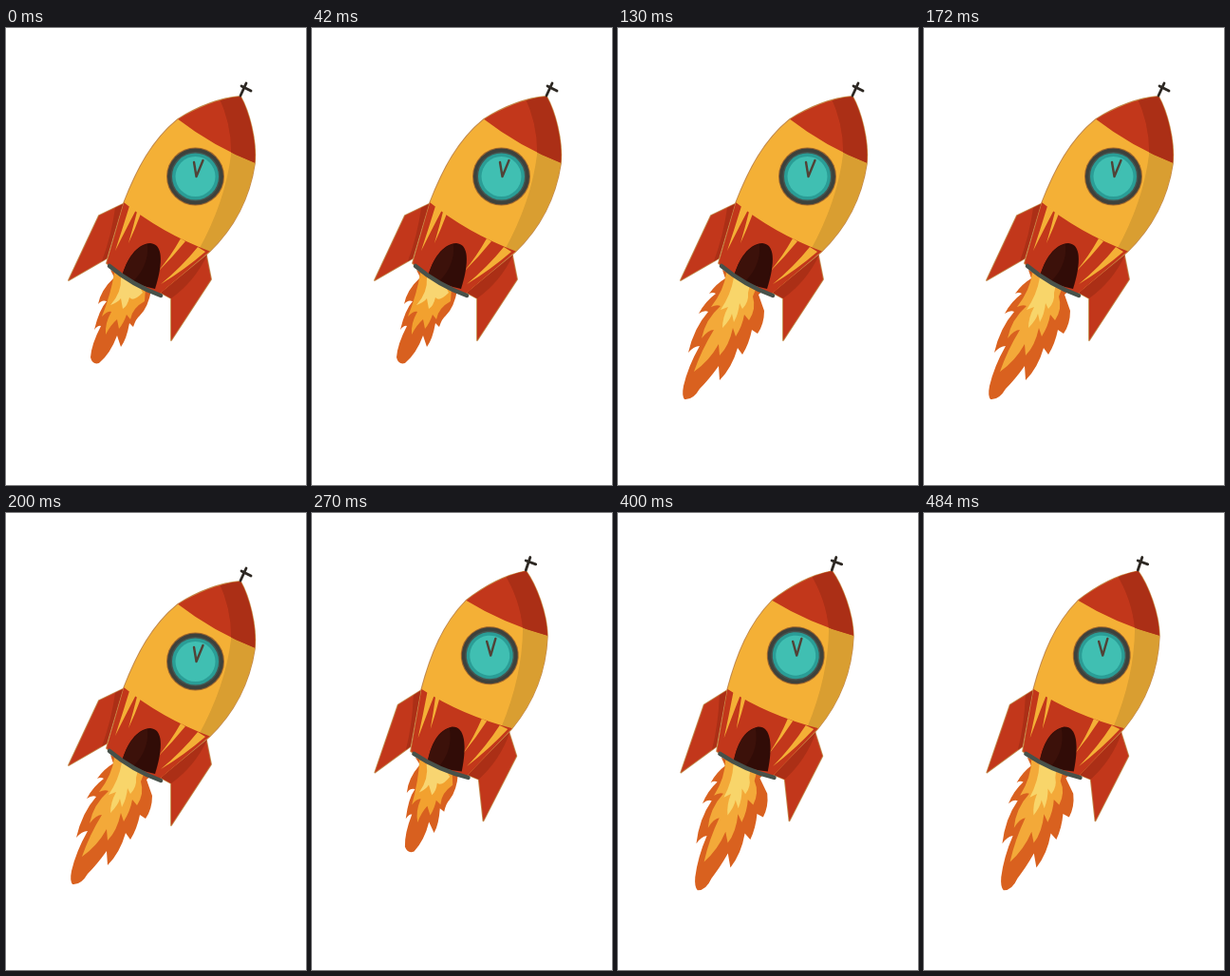
An HTML page with a canvas for the animation above (540 ms loop, 316 by 480 pixels).

```html
<!DOCTYPE html>
<html lang="en">
<head>
<meta charset="utf-8">
<title>Rocket</title>
<style>
html, body { margin: 0; width: 100%; height: 100%; overflow: hidden; background: #fff; }
canvas { display: block; width: 316px; height: 480px; }
</style>
</head>
<body>
<canvas id="stage"></canvas>
<script>
const W = 316, H = 480, LOOP = 540;
const PIVOT = [135, 266], TILT = -6.2 * Math.PI / 180;
const canvas = document.getElementById('stage');
const ctx = canvas.getContext('2d');
const dpr = window.devicePixelRatio || 1;
canvas.width = W * dpr;
canvas.height = H * dpr;

const RED = '#c2371b', DARK_RED = '#ab2f16', YELLOW = '#f4b036', DARK_YELLOW = '#d99e31';
const EDGE = '#c28a4c', METAL = '#47514a';

const hull = new Path2D('M247 72 C224 74 200 84 181 96 C154 118 138 148 124 184 L106 247 Q131 268 162 279 L214 235 C243 207 257 175 262 142 C264 118 256 88 247 72 Z');
const nose = new Path2D('M170 60 L180 95 Q219 125 263 142 L280 130 L260 60 Z');
const skirt = new Path2D('M118 180 L124 183 Q163 215 216 235 L214 290 H95 Z');
const shade = new Path2D('M223 70 Q239 101 237 133 Q231 182 203 233 L225 245 L275 150 L255 68 Z');
const shadeNose = new Path2D('M223 70 Q238 101 237 133 L263 145 L275 130 L250 65 Z');
const finLeft = new Path2D('M66 265 L98 197 L123 185 L106 242 Z');
const finLeftShade = new Path2D('M115 189 L123 185 L106 242 L101 245 Q111 218 115 189 Z');
const finRight = new Path2D('M174 328 L216 264 L211 239 L163 278 L174 284 Z');
const finRightShade = new Path2D('M212 238 L163 278 L174 284 Q199 266 212 238 Z');
const stripes = new Path2D('M130 187 L137 191 Q127 210 115 234 Q123 210 130 187 Z M138 193 L142 195 Q136 211 129 226 Q134 209 138 193 Z M184 221 L189 224 Q176 240 160 256 Q174 239 184 221 Z M202 230 L210 235 Q188 254 163 269 Q185 251 202 230 Z');
const door = new Path2D('M122 261 C127 243 137 227 152 226 C165 227 166 245 157 274 Q138 270 122 261 Z');
const doorLight = new Path2D('M122 261 C127 243 137 230 149 227 Q151 249 134 266 Z');
const rim = new Path2D('M109 250 Q133 270 163 281');
const antenna = new Path2D('M247 71 L253 58 M248 61 L258 66');
const hands = new Path2D('M198 141 L200.5 156 L207.5 139');

const flames = {
  small: [
    ['#d8601f', 'M110 254 L114 262 Q100 275 97 290 Q101 285 106 287 Q98 296 93 317 Q97 312 100 313 Q90 332 89 346 Q91 354 98 352 Q110 342 117 323 L121 335 Q127 327 130 310 L134 314 Q137 305 141 302 Q150 293 153 275 Z'],
    ['#f2a12f', 'M114 257 Q111 278 101 303 Q107 297 111 298 Q104 310 105 322 Q110 312 117 306 L119 316 Q124 310 127 301 L131 306 Q133 294 146 287 L147 273 Z'],
    ['#f8d571', 'M121 262 Q122 278 110 291 Q118 288 121 284 L123 295 Q128 292 130 283 Q134 288 144 278 L140 270 Z']
  ],
  big: [
    ['#d9611f', 'M110 254 L113 263 Q103 269 96 279 Q100 277 103 279 Q92 287 85 300 Q91 296 95 298 Q80 315 74 341 Q80 334 86 334 Q74 355 69 376 Q67 386 70 390 Q79 391 86 379 Q96 369 106 355 L107 370 Q120 357 126 336 L131 343 Q138 332 141 317 L147 321 Q154 311 154 297 L148 280 L154 275 Z'],
    ['#f3a939', 'M114 257 Q112 275 98 293 Q104 290 108 292 Q92 306 88 326 Q95 317 101 317 Q88 338 80 361 Q96 350 106 332 L107 344 Q117 334 121 315 L124 324 Q131 313 133 301 L138 307 Q146 295 142 282 L146 272 Z'],
    ['#f8d56a', 'M122 262 Q119 280 108 296 L116 293 Q110 304 110 315 Q118 307 120 300 L122 309 Q127 300 128 289 L131 295 Q138 288 137 278 L139 270 Z']
  ]
};
for (const set of Object.values(flames))
  for (const layer of set) layer[1] = new Path2D(layer[1]);

function fill(path, color) {
  ctx.fillStyle = color;
  ctx.fill(path);
}

function line(path, color, width) {
  ctx.strokeStyle = color;
  ctx.lineWidth = width;
  ctx.stroke(path);
}

function disc(r, color) {
  ctx.fillStyle = color;
  ctx.beginPath();
  ctx.arc(199.5, 156, r, 0, 2 * Math.PI);
  ctx.fill();
}

function drawBody() {
  ctx.save();
  ctx.clip(hull);
  fill(hull, YELLOW);
  fill(shade, DARK_YELLOW);
  fill(nose, RED);
  ctx.save();
  ctx.clip(nose);
  fill(shadeNose, DARK_RED);
  ctx.restore();
  fill(skirt, RED);
  fill(stripes, YELLOW);
  ctx.restore();
}

function drawWindow() {
  disc(30.5, '#a0662c');
  disc(29.5, '#3d413c');
  disc(26, '#45544f');
  disc(24.5, '#2a9d96');
  disc(21, '#40bfb2');
  line(hands, '#514237', 2.4);
}

function drawRocket(flame) {
  for (const [color, path] of flames[flame]) fill(path, color);
  for (const shape of [hull, finLeft, finRight]) line(shape, EDGE, 1.8);
  fill(finLeft, RED);
  fill(finLeftShade, DARK_RED);
  fill(finRight, RED);
  fill(finRightShade, DARK_RED);
  drawBody();
  fill(door, '#310c07');
  fill(doorLight, '#3c110a');
  line(rim, METAL, 4.5);
  line(antenna, '#2d2823', 2.8);
  drawWindow();
}

function draw(t) {
  const tilted = t >= 270;
  const flame = t >= 400 || (t >= 130 && t < 270) ? 'big' : 'small';
  ctx.setTransform(dpr, 0, 0, dpr, 0, 0);
  ctx.fillStyle = '#fff';
  ctx.fillRect(0, 0, W, H);
  ctx.lineCap = ctx.lineJoin = 'round';
  if (tilted) {
    ctx.translate(...PIVOT);
    ctx.rotate(TILT);
    ctx.translate(-PIVOT[0], -PIVOT[1]);
  }
  drawRocket(flame);
}

const start = performance.now();
function tick() {
  draw((performance.now() - start) % LOOP);
  requestAnimationFrame(tick);
}
tick();
</script>
</body>
</html>
```
